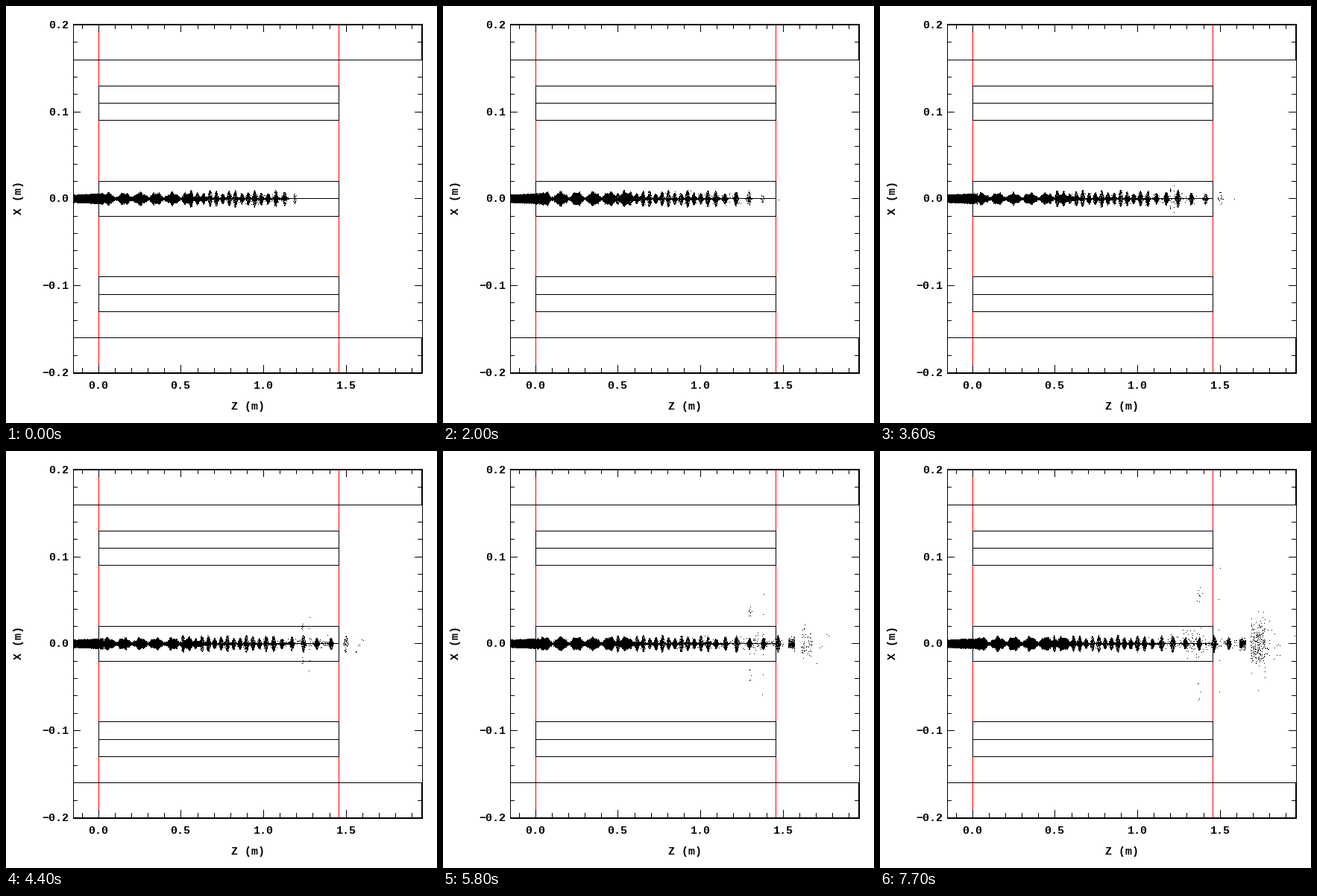
A matplotlib script that plays this animation: 578 by 560 pixels, repeating every 8000 ms.

```python
import numpy as np
import matplotlib.pyplot as plt
from matplotlib.animation import FuncAnimation

W, H, DPI = 578, 560, 64
LEFT, RIGHT, TOP, BOTTOM = 90, 558, 24, 493
GAP_L, GAP_R = 124, 446
AXIS = 258.4
BLACK, RED = (0, 0, 0), (255, 0, 0)

TICK, FRAMES = 100, 80
# Runs of evenly spaced simulation steps: start, stop, spacing in ms
RUNS = [(0, 201, 200), (800, 2501, 100), (3100, 3401, 100), (3600, 3701, 100),
        (3900, 4201, 300), (4400, 6201, 200), (6450, 7701, 250)]
STEP_TIMES = np.concatenate([np.arange(*run) for run in RUNS])


def px(z):
    return int(124.3 + 221.3 * z)


def py(x):
    return int(258.87 - 1167.5 * x)


def hline(img, y, x0, x1, color=BLACK):
    img[y, int(x0):int(x1) + 1] = color


def vline(img, x, y0, y1, color=BLACK):
    img[int(y0):int(y1) + 1, x] = color


def box(img, x0, x1, y0, y1):
    for y in (y0, y1):
        hline(img, y, x0, x1)
    for x in (x0, x1):
        vline(img, x, y0, y1)


def tick_length(k):
    return 9.5 if k % 5 == 0 else 5.5


def draw_background():
    img = np.full((H, W, 3), 255, np.uint8)
    for x in (GAP_L, GAP_R):
        vline(img, x, TOP, BOTTOM, RED)
    for center, half in ((0.11, 0.02), (0, 0.02), (-0.11, 0.02)):
        box(img, GAP_L, GAP_R, py(center + half), py(center - half))
        hline(img, py(center), GAP_L, GAP_R)
    box(img, LEFT, RIGHT, TOP, BOTTOM)
    for side in (1, -1):
        wall, edge = py(0.16 * side), py(0.2 * side)
        hline(img, wall, LEFT, RIGHT)
        hline(img, edge, LEFT, RIGHT)
        vline(img, RIGHT - 1, min(wall, edge), max(wall, edge))

    for k in range(-1, 20):
        n = tick_length(k)
        vline(img, px(k / 10), TOP, 25.4 + n)
        vline(img, px(k / 10), 492.4 - n, BOTTOM)
    for k in range(-9, 10):
        n = tick_length(k)
        hline(img, py(k / 50), LEFT, 90.3 + n)
        hline(img, py(k / 50), 558.3 - n, RIGHT)
    return img


def dots(img, x, dy):
    x = np.rint(x).astype(int)
    y = np.rint(AXIS + np.asarray(dy)).astype(int)
    ok = (x > LEFT) & (x < RIGHT) & (y > TOP) & (y < BOTTOM)
    img[y[ok], x[ok]] = BLACK


def bunch_x(u):
    """Column of a bunch after u RF periods: steady drift, then acceleration."""
    return 242 + 8.5 * u + 14.4 * np.logaddexp(0, (u - 15.4) / 1.2)


def draw_core(img, phase, rng):
    """Dense beam: injected strip, slow envelope waves, thin tail."""
    centers = bunch_x(np.arange(-18, 4) + phase % 1)
    swell = 5 + 0.8 * np.cos(2 * np.pi * phase)
    for x in range(LEFT + 1, 380):
        if x < GAP_L:
            half = 5 + (x - LEFT) / 34 * 1.5 + rng.uniform(-0.4, 0.4)
        elif x < 250:
            wave = abs(np.cos(np.pi * (x - 136) / 21.7)) ** 1.3
            near = np.min(np.abs(centers - x))
            half = 1.5 + wave * (swell + 2.8 * np.exp(-(near / 2) ** 2))
            if x < 131:
                half = max(half, 6.5)
            half += rng.uniform(-1, 1)
        else:
            half = np.interp(x, [250, 262, 280], [3, 2.5, 0.6])
            half += rng.uniform(-0.7, 0.7)
        half = max(half, 0)
        vline(img, x, np.rint(AXIS - half), np.rint(AXIS + half))


def draw_bunches(img, phase):
    solid = 14 - 0.4 * phase
    boost = 1 + 5 * np.clip((phase - 8) / 2, 0, 1.5)
    for m in range(-13, 16):
        x0 = bunch_x(m + phase)
        if not 232 < x0 < 556:
            continue
        lead = max(m - solid, 0)
        density = np.exp(-lead ** 1.6) * (boost if lead > 1 else max(boost * lead, 1))
        count = int(230 * min(density * 0.65 if lead else 1, 1))
        rng = np.random.default_rng(100 + m)
        gauss_x, gauss_y = rng.normal(size=(2, 230))[:, :count]
        even_x, even_y = rng.uniform(-1, 1, (2, 230))[:, :count]
        spread = np.clip((lead - 0.4) / 0.6, 0, 1) * np.clip(x0 - 463, 0, 45)
        if spread > 0:
            dots(img, x0 - 2 + even_x * (4 + 0.13 * spread), gauss_y * (3 + 0.3 * spread))
        else:
            height = 9.5 + 2.5 * np.sin(1.9 * m + 2.2 * phase)
            dx = gauss_x * 1.6
            dots(img, x0 + dx, even_y * height * np.exp(-(dx / 2.5) ** 2))


def draw_haze(img, phase, step, rng):
    front = bunch_x(14 + 0.6 * phase)
    n = 90 + 2 * step
    dots(img, 255 + (front - 255) * rng.uniform(size=n) ** 0.6, rng.normal(0, 3.6, n))
    n = int(65 * np.clip((step - 28) / 12, 0, 1))
    dots(img, rng.normal(417, 8, n), rng.normal(0, 9, n))


def draw_lost(img, step):
    """Particles thrown out of the beam, flying straight until they hit a plate."""
    age = step - 20
    if age < 3:
        return
    rng = np.random.default_rng(7)
    slow = rng.normal(2.05, 0.12, 15), rng.uniform(2.3, 3.3, 15) * rng.choice([-1, 1], 15)
    fast = rng.normal(3.2, 0.05, 6), np.linspace(-4.4, 4.6, 6)
    vx, vy = np.hstack([slow, fast])
    free = np.abs(vy * age) < 104
    dots(img, (381 + vx * age)[free], (vy * age)[free])


def draw_state(step):
    rng = np.random.default_rng(step)
    phase = 0.68 + 0.24 * step
    img = background.copy()
    draw_core(img, phase, rng)
    draw_bunches(img, phase)
    draw_haze(img, phase, step, rng)
    draw_lost(img, step)
    return img


def label(x, y, text, **kw):
    fig.text(x / W, 1 - y / H, text, fontsize=15 * 72 / DPI, **kw)


plt.rcParams.update({"font.family": "Liberation Mono", "font.weight": "bold"})
fig = plt.figure(figsize=(W / DPI, H / DPI), dpi=DPI, facecolor="white")
background = draw_background()
picture = fig.figimage(background, origin="upper")

for k in range(-2, 3):
    text = f"{k / 10:.1f}".replace("-", "\u2212")
    label(84, py(k / 10) + 5, text, ha="right", va="baseline")
for k in range(4):
    label(px(k / 2), 514, f"{k / 2:.1f}", ha="center", va="baseline")
label(324.5, 542, "Z (m)", ha="center", va="baseline")
label(17, 258, "X (m)", ha="center", va="center", rotation=90)


def update(frame):
    step = int(np.searchsorted(STEP_TIMES, frame * TICK, side="right")) - 1
    picture.set_data(draw_state(step))
    return (picture,)


anim = FuncAnimation(fig, update, frames=FRAMES, interval=TICK, repeat=True,
                     repeat_delay=0, blit=False)
plt.show()
```
